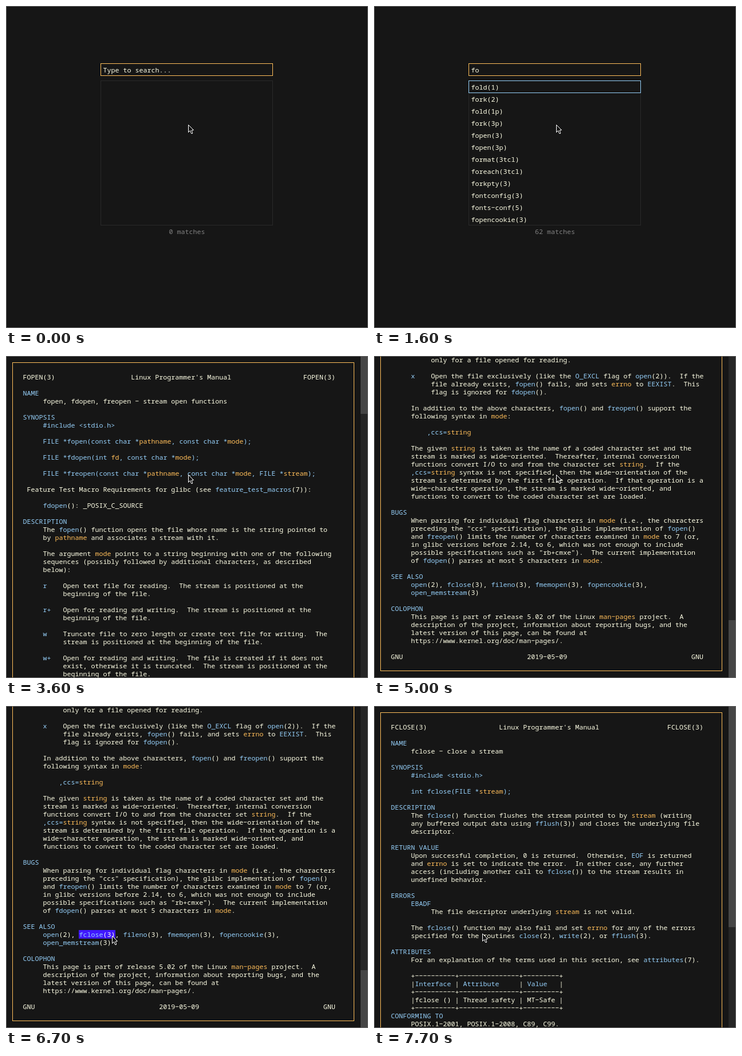
These frames come from a looping animation (632 by 562 pixels, 8000 ms). An HTML page with a canvas:

```html
<!DOCTYPE html>
<html lang="en">
<head>
<meta charset="utf-8">
<title>Manual page search</title>
<style>
html, body { margin: 0; width: 100%; height: 100%; overflow: hidden; background: #161616; }
canvas { display: block; }
</style>
</head>
<body>
<canvas id="stage" width="632" height="562"></canvas>
<script>
const ctx = document.getElementById('stage').getContext('2d');
const BG = '#161616', TEXT = '#ffffe6', BLUE = '#96d0fa', ORANGE = '#ffbe5a';
const GREY = '#808080', CELL = 7;

// In page text, ^ toggles blue and ~ toggles orange.
const fopenTop = `FOPEN(3)                   Linux Programmer's Manual                  FOPEN(3)

^NAME^
     fopen, fdopen, freopen - stream open functions

^SYNOPSIS
     #include <stdio.h>

     FILE *fopen(const char *~pathname~, const char *~mode~);

     FILE *fdopen(int ~fd~, const char *~mode~);

     FILE *freopen(const char *~pathname~, const char *~mode~, FILE *~stream~);^

 Feature Test Macro Requirements for glibc (see ^feature_test_macros^(7)):

     ^fdopen^(): _POSIX_C_SOURCE

^DESCRIPTION^
     The ^fopen^() function opens the file whose name is the string pointed to
     by ~pathname~ and associates a stream with it.

     The argument ~mode~ points to a string beginning with one of the following
     sequences (possibly followed by additional characters, as described
     below):

     ^r^    Open text file for reading.  The stream is positioned at the
          beginning of the file.

     ^r+^   Open for reading and writing.  The stream is positioned at the
          beginning of the file.

     ^w^    Truncate file to zero length or create text file for writing.  The
          stream is positioned at the beginning of the file.

     ^w+^   Open for reading and writing.  The file is created if it does not
          exist, otherwise it is truncated.  The stream is positioned at the
          beginning of the file.`;

const fopenEnd = `          only for a file opened for reading.

     ^x^    Open the file exclusively (like the ^O_EXCL^ flag of ^open^(2)).  If the
          file already exists, ^fopen^() fails, and sets ~errno~ to ^EEXIST^.  This
          flag is ignored for ^fdopen^().

     In addition to the above characters, ^fopen^() and ^freopen^() support the
     following syntax in ~mode~:

         ^,ccs=^~string~

     The given ~string~ is taken as the name of a coded character set and the
     stream is marked as wide-oriented.  Thereafter, internal conversion
     functions convert I/O to and from the character set ~string~.  If the
     ^,ccs=^~string~ syntax is not specified, then the wide-orientation of the
     stream is determined by the first file operation.  If that operation is a
     wide-character operation, the stream is marked wide-oriented, and
     functions to convert to the coded character set are loaded.

^BUGS^
     When parsing for individual flag characters in ~mode~ (i.e., the characters
     preceding the "ccs" specification), the glibc implementation of ^fopen^()
     and ^freopen^() limits the number of characters examined in ~mode~ to 7 (or,
     in glibc versions before 2.14, to 6, which was not enough to include
     possible specifications such as "rb+cmxe").  The current implementation
     of ^fdopen^() parses at most 5 characters in ~mode~.

^SEE ALSO^
     ^open^(2), ^fclose^(3), ^fileno^(3), ^fmemopen^(3), ^fopencookie^(3),
     ^open_memstream^(3)

^COLOPHON^
     This page is part of release 5.02 of the Linux ~man-pages~ project.  A
     description of the project, information about reporting bugs, and the
     latest version of this page, can be found at
     https://www.kernel.org/doc/man-pages/.

GNU                               2019-05-09                               GNU`;

const fclosePage = `FCLOSE(3)                  Linux Programmer's Manual                 FCLOSE(3)

^NAME^
     fclose - close a stream

^SYNOPSIS
     #include <stdio.h>

     int fclose(FILE *~stream~);

DESCRIPTION^
     The ^fclose^() function flushes the stream pointed to by ~stream~ (writing
     any buffered output data using ^fflush^(3)) and closes the underlying file
     descriptor.

^RETURN VALUE^
     Upon successful completion, 0 is returned.  Otherwise, ^EOF^ is returned
     and ~errno~ is set to indicate the error.  In either case, any further
     access (including another call to ^fclose^()) to the stream results in
     undefined behavior.

^ERRORS
     EBADF^
          The file descriptor underlying ~stream~ is not valid.

     The ^fclose^() function may also fail and set ~errno~ for any of the errors
     specified for the routines ^close^(2), ^write^(2), or ^fflush^(3).

^ATTRIBUTES^
     For an explanation of the terms used in this section, see ^attributes^(7).

     +----------+---------------+---------+
     |^Interface^ | ^Attribute^     | ^Value^   |
     +----------+---------------+---------+
     |fclose () | Thread safety | MT-Safe |
     +----------+---------------+---------+
^CONFORMING TO^
     POSIX.1-2001, POSIX.1-2008, C89, C99.`;

const listF = 'df(1p) cfree(3) afm2pl(1) cflow(1p) afm2tfm(1) _flushlbf(3) cfmakeraw(3) cfsetspeed(3) cfsetospeed(3) afs_syscall(2) cfsetispeed(3) cfgetospeed(3)'.split(' ');
const listFo = 'fold(1) fork(2) fold(1p) fork(3p) fopen(3) fopen(3p) format(3tcl) foreach(3tcl) forkpty(3) fontconfig(3) fonts-conf(5) fopencookie(3)'.split(' ');
const listFop = 'fopen(3) fopen(3p) fopencookie(3) pdfopen(1) pcap_fopen_offline(3pc) pcap_fopen_offline_with_tstamp_precision(3pc) pcap_dump_fopen(3pc)'.split(' ');

function rect(x, y, w, h, color) {
  ctx.fillStyle = color;
  ctx.fillRect(x, y, w, h);
}

function frame(x, y, w, h, color) {
  ctx.strokeStyle = color;
  ctx.lineWidth = 1;
  ctx.strokeRect(x + .5, y + .5, w - 1, h - 1);
}

// Hyphens are drawn as wide as a minus sign.
function write(text, x, y, color = TEXT) {
  ctx.fillStyle = color;
  ctx.fillText(text.replaceAll('-', '\u2212'), x, y);
}

function drawSearch(query, list, count) {
  frame(165, 100, 301, 22, ORANGE);
  write(query || 'Type to search...', 169.5, 116);
  frame(165, 130, 301, 253, '#292929');
  if (list.length) frame(165, 130, 301, 22, BLUE);
  list.forEach((name, i) => write(name, 169.5, 146 + 21 * i));
  const label = count + ' matches';
  write(label, 316 - label.length * CELL / 2, 398, GREY);
}

function drawPage(text, baseline, boxTop, boxBottom, thumbTop, thumbBottom) {
  frame(11, boxTop, 597, boxBottom - boxTop, ORANGE);
  rect(619, 1, 12, 560, '#262626');
  rect(619, thumbTop, 12, thumbBottom - thumbTop, '#464646');
  let col = 0, row = 0, blue = false, orange = false;
  for (const part of text.split(/([\^~\n])/)) {
    if (part === '^') blue = !blue;
    else if (part === '~') orange = !orange;
    else if (part === '\n') { row++; col = 0; }
    else {
      const color = orange ? ORANGE : blue ? BLUE : TEXT;
      write(part, 29.5 + CELL * col, baseline + 14 * row, color);
      col += part.length;
    }
  }
}

function drawPointer(x, y) {
  const points = [[0, 0], [0, 13], [3, 10], [5, 15], [7, 15], [7, 13], [5.5, 9.5], [9, 9]];
  ctx.beginPath();
  for (const [px, py] of points) ctx.lineTo(x + px + .5, y + py + .5);
  ctx.closePath();
  ctx.fillStyle = BG;
  ctx.fill();
  ctx.strokeStyle = '#fff';
  ctx.lineWidth = 1;
  ctx.stroke();
}

function pointerAt(t) {
  const steps = (start, n) => Math.min(n, Math.max(0, Math.floor((t - start) / 100) + 1)) / n;
  const p = steps(5400, 7), glide = p * p * (3 - 2 * p), hover = steps(6200, 6);
  const a = t >= 7400, b = t >= 7500, c = t >= 7700;
  return [
    Math.round(318 - 118 * glide - 15 * hover + a + b + 2 * c),
    Math.round(207 + 196 * glide - 2 * hover - a - 2 * b - c)
  ];
}

function draw(now) {
  const t = now % 8000, [x, y] = pointerAt(t);
  rect(0, 0, 632, 562, BG);
  ctx.font = '500 11.667px "Noto Sans Mono", "DejaVu Sans Mono", monospace';

  if (t < 1200) drawSearch('', [], 0);
  else if (t < 1600) drawSearch('f', listF, 100);
  else if (t < 1800) drawSearch('fo', listFo, 62);
  else if (t < 3600) drawSearch('fopen'.slice(0, t < 2000 ? 3 : t < 2200 ? 4 : 5), listFop, 7);
  else if (t < 5000) drawPage(fopenTop, 41, 11, 600, 1, 101);
  else if (t < 7000) {
    if (x < 191) rect(127, 391, 64, 15, '#4018ff');
    drawPage(fopenEnd, 11, -10, 550, 461, 561);
  } else drawPage(fclosePage, 41, 11, 600, 1, 386);

  drawPointer(x, y);
  frame(0, 0, 632, 562, '#6c6c6c');
  requestAnimationFrame(draw);
}
requestAnimationFrame(draw);
</script>
</body>
</html>
```
